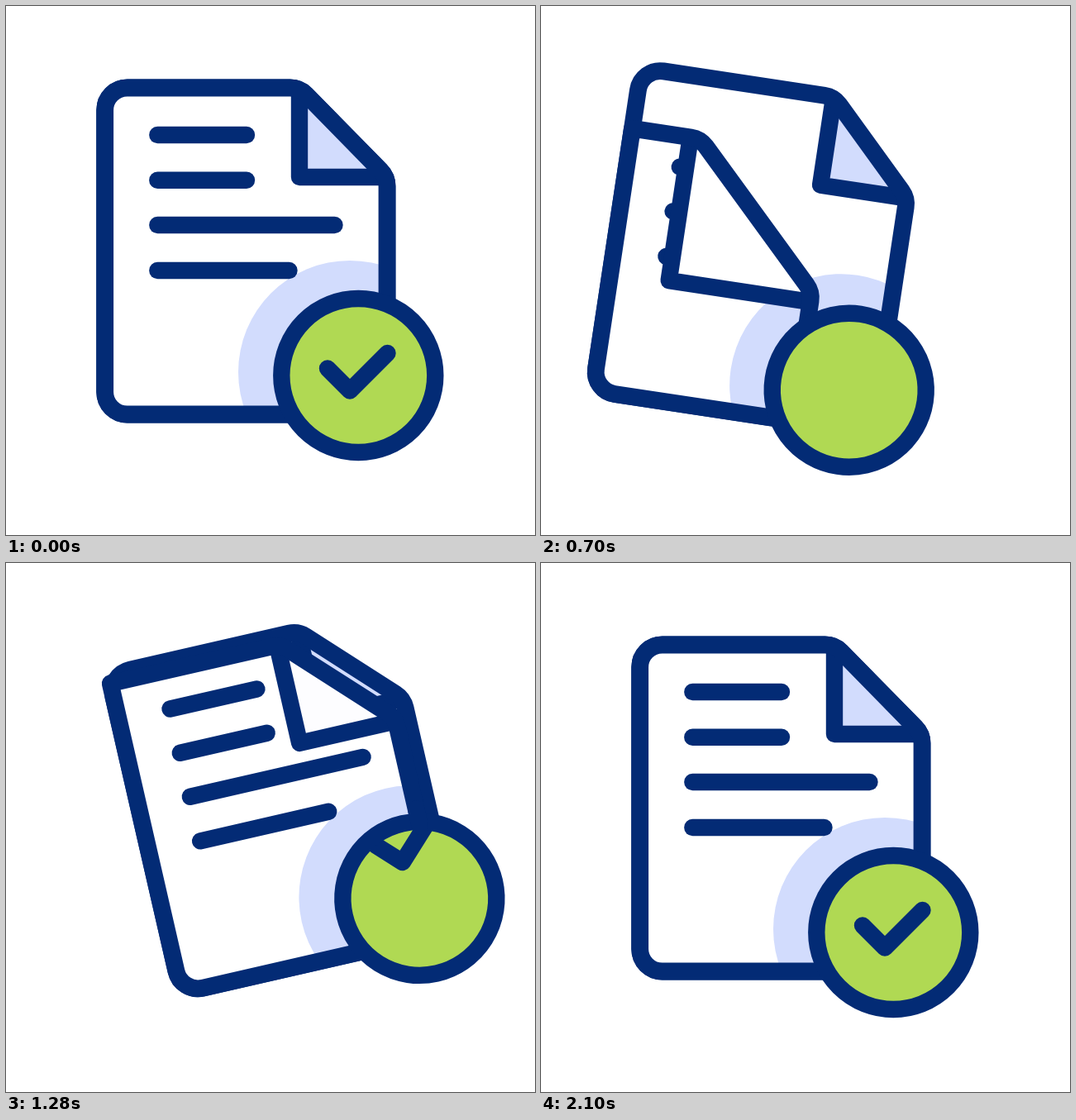
An HTML page with a canvas that plays this animation: 640x640 px, repeating every 2.4 s.

```html
<!DOCTYPE html>
<html lang="en">
<head>
<meta charset="utf-8">
<title>Document approved</title>
<style>
  html, body { margin: 0; width: 100%; height: 100%; overflow: hidden; background: #fff; }
  canvas { display: block; width: 100vmin; height: 100vmin; }
</style>
</head>
<body>
<canvas id="stage" width="640" height="640"></canvas>
<script>
const c = document.getElementById('stage').getContext('2d');
const NAVY = '#032b75', GREEN = '#b0d953', PALE = '#d2dcfd', YELLOW = '#ffcb50';
const LOOP = 2400, TURN = Math.PI * 2;
const LEFT = 119.7, TOP = 99, BOTTOM = 494, RADIUS = 27;
const PIVOT = [281.5, 99];
const SEAL = { x: 426.3, y: 447, r: 93 };

// x end, y, and the time its highlight begins
const LINES = [[291, 156, 1290], [291, 210.7, 1380], [397.5, 265, 1455], [342.5, 320, 1570]];
const LINE_START = 183.3;

const clamp = v => Math.max(0, Math.min(1, v));
const span = (t, a, b) => clamp((t - a) / (b - a));
const ease = (t, a, b) => { const u = span(t, a, b); return u * u * (3 - 2 * u); };

function stroke(color, width) {
  c.strokeStyle = color;
  c.lineWidth = width;
  c.stroke();
}

function fill(color) {
  c.fillStyle = color;
  c.fill();
}

function polyline(...points) {
  c.beginPath();
  points.forEach(p => c.lineTo(...p));
}

function disc(x, y, r) {
  c.beginPath();
  c.arc(x, y, r, 0, TURN);
}

// Sheet geometry when its fold has been pulled left by d;
// slack is how far the slanted edge bulges beyond the fold
function sheet(d, slack = 0) {
  const top = TOP + d * (0.37 + 0.0005 * d);
  const right = 461 - d * (0.505 + 0.00052 * d);
  const foldX = 355 - d;
  return { d, top, right, foldX, foldY: top + right - foldX + 2, slack: Math.min(d, slack) };
}

function outline(s) {
  c.beginPath();
  c.moveTo(LEFT, 300);
  c.arcTo(LEFT, s.top, s.foldX, s.top, Math.max(0, RADIUS - s.d));
  c.arcTo(s.foldX + s.slack, s.top, s.right, s.foldY - s.slack, RADIUS);
  c.arcTo(s.right, s.foldY - s.slack, s.right, BOTTOM, RADIUS);
  c.arcTo(s.right, BOTTOM, LEFT, BOTTOM, RADIUS);
  c.arcTo(LEFT, BOTTOM, LEFT, 300, RADIUS);
  c.closePath();
}

function drawSheet(s, flapAlpha, drawText) {
  c.save();
  outline(s);
  c.clip();
  fill('#fff');
  disc(416, 443, 135);
  fill(PALE);
  if (drawText) drawText();
  c.beginPath();
  c.rect(s.foldX, s.top, s.right - s.foldX, s.foldY - s.top);
  fill('#fff');
  c.globalAlpha = flapAlpha;
  fill(PALE);
  c.restore();
  polyline([s.foldX, s.top + 6], [s.foldX, s.foldY], [s.right - 6, s.foldY]);
  stroke(NAVY, 20.4);
  outline(s);
  stroke(NAVY, 20.8);
}

// The lines grow back from the last to the first while the sheet closes
function drawText(t, closing) {
  LINES.forEach(([end, y], i) => {
    const start = 964 - 27 * i;
    const grown = closing ? ease(t, start, start + 240) : 1;
    if (!grown) return;
    polyline([LINE_START, y], [LINE_START + (end - LINE_START) * grown, y]);
    stroke(NAVY, 20.4);
  });
}

function drawSeal(t) {
  disc(SEAL.x, SEAL.y, SEAL.r);
  fill(GREEN);
  c.save();
  c.clip();
  const leave = span(t, 300, 680) ** 3;
  const arrive = (1 - span(t, 1140, 1918)) ** 3;
  c.translate(0, t < 900 ? 125 * leave : -120 * arrive);
  polyline([389, 438.5], [416, 465.5], [461.5, 420]);
  stroke(NAVY, 20.4);
  c.restore();
  disc(SEAL.x, SEAL.y, SEAL.r);
  stroke(NAVY, 20.4);
}

function drawHighlights(t) {
  LINES.forEach(([end, y, start]) => {
    const head = ease(t, start, start + 160);
    const tail = ease(t, start + 145, start + 305);
    if (head <= tail) return;
    const at = k => [LINE_START + (end - LINE_START) * k, y];
    polyline(at(tail), at(head));
    stroke(YELLOW, 22.6);
  });
  const head = ease(t, 1398, 2079), tail = ease(t, 1585, 2090);
  if (head > tail) {
    c.beginPath();
    c.arc(SEAL.x, SEAL.y, SEAL.r, tail * TURN, head * TURN);
    stroke(YELLOW, 22.6);
  }
}

function draw(t) {
  const tilt = 16 * ease(t, 118, 443) - 32 * ease(t, 498, 1148) + 16 * ease(t, 1148, 1620);
  const pull = Math.max(0, 0.282 * Math.min(t - 119, 1381 - t));
  const closing = t > 750;
  const front = sheet(pull, closing ? 4 : 12);

  c.fillStyle = '#fff';
  c.fillRect(0, 0, 640, 640);
  c.save();
  c.lineCap = c.lineJoin = 'round';
  c.translate(...PIVOT);
  c.rotate(tilt * Math.PI / 180);
  c.translate(-PIVOT[0], -PIVOT[1]);

  drawSheet(sheet(0), 1);
  drawSheet(front, clamp(1 - pull / 30), () => drawText(t, closing));
  drawSeal(t);
  // The closing sheet's edge ends just over the seal
  if (closing && pull > 0 && front.foldY < 361) {
    polyline([front.right, Math.max(front.foldY, 340)], [front.right, 362]);
    stroke(NAVY, 20.4);
  }
  drawHighlights(t);
  c.restore();
}

const began = performance.now();
function tick() {
  draw((performance.now() - began) % LOOP);
  requestAnimationFrame(tick);
}
tick();
</script>
</body>
</html>
```
